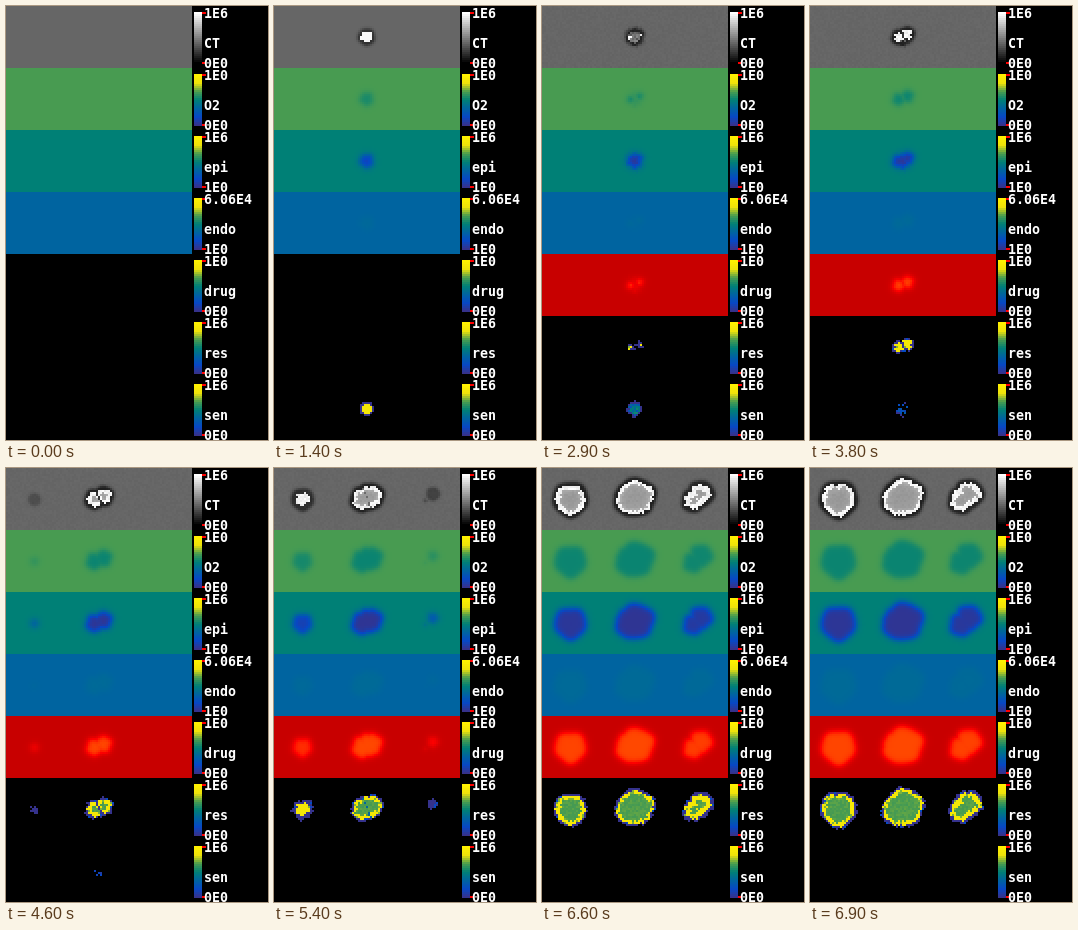
These frames come from a looping animation (262x434 px, 7000 ms). An HTML page with a canvas:

```html
<!DOCTYPE html>
<html lang="en">
<head>
<meta charset="utf-8">
<title>Tumour growth panels</title>
<style>
  html, body { margin: 0; width: 100%; height: 100%; overflow: hidden; background: #000; }
  canvas, svg { position: absolute; left: 0; top: 0; display: block; }
  canvas { width: 186px; height: 434px; image-rendering: pixelated; }
  text { font: bold 13.3px "DejaVu Sans Mono", monospace; fill: #fff; }
</style>
</head>
<body>
<canvas id="cells" width="93" height="217"></canvas>
<svg id="legend" width="262" height="434" viewBox="0 0 262 434"></svg>
<script>
const LOOP = 7000, STEP = 100, END = 6900, COLS = 93, ROWS = 31;
const DRUG_START = 1500;
const BLACK = [0, 0, 0];

const clamp = v => Math.max(0, Math.min(1, v));
const rise = (t, from, tau) => t < from ? 0 : 1 - Math.exp(-(t - from) / tau);
const sigmoid = v => 1 / (1 + Math.exp(-v));

// Colour map with evenly spaced stops
function palette(...stops) {
  const rgb = stops.map(s => [1, 3, 5].map(p => parseInt(s.slice(p, p + 2), 16)));
  return v => {
    const p = clamp(v) * (rgb.length - 1);
    const i = Math.min(Math.floor(p), rgb.length - 2);
    return rgb[i].map((c, n) => c + (rgb[i + 1][n] - c) * (p - i));
  };
}
const grey = palette('#000000', '#ffffff');
const heat = palette('#35328c', '#0648c6', '#0064a0', '#008076', '#4a9c50', '#eee20a', '#fff000');
const red = palette('#c80000', '#ff0000', '#ff4800');

const panels = [
  ['CT', '1E6', '0E0'], ['O2', '1E0', '0E0'], ['epi', '1E6', '1E0'],
  ['endo', '6.06E4', '1E0'], ['drug', '1E0', '0E0'], ['res', '1E6', '0E0'], ['sen', '1E6', '0E0']
];

// Lobes reach `size` at the end of the loop; `ease` bends their growth
const lobe = (x, y, born, size, ease) => ({ x, y, born, size, ease });
const colonies = [
  { seen: 400, core: 0, spread: 0, lobes: [
    lobe(97.5, 28.3, 1900, 17.3, 1), lobe(88.7, 31.4, 1900, 17.3, 1), lobe(93, 29.5, 4200, 20, .55)] },
  { seen: 4300, core: 5, spread: 7, lobes: [lobe(28.5, 31.5, 4500, 18.5, .6)] },
  { seen: 4900, core: 5, spread: 8, lobes: [
    lobe(159, 26, 5000, 14, .6), lobe(151.5, 32.5, 5400, 13, .6)] }
];
const sensitive = { x: 92.6, y: 31 };

function hash(x, y, s) {
  const v = Math.sin(x * 127.1 + y * 311.7 + s * 74.7) * 43758.5453;
  return v - Math.floor(v);
}

const radius = (l, t) => l.size * Math.pow(clamp((t - l.born) / (END - l.born)), l.ease);

// Distance inside a slightly wavy circle
function depth(x, y, c, r) {
  const a = Math.atan2(y - c.y, x - c.x);
  const wave = .03 * Math.sin(3 * a + c.x) + .03 * Math.sin(5 * a + c.y);
  return r * (1 + wave) - Math.hypot(x - c.x, y - c.y);
}

const ctx = document.getElementById('cells').getContext('2d');
const image = ctx.createImageData(COLS, ROWS * panels.length);

function paint(t) {
  const drug = t >= DRUG_START;
  const density = drug ? Math.exp((DRUG_START - t) / 1400) : 1;
  const alive = clamp((4800 - t) / 2000);
  const senR = Math.min(.0052 * t, 8.5);
  const cleft = t > 3000 && t < 5900;
  const fused = t > 4900;

  const state = colonies.map(c => {
    const young = Math.exp(-Math.max(0, t - c.lobes[0].born) / 700);
    return {
      ...c, young, amp: rise(t, c.seen, 650),
      radii: c.lobes.map(l => radius(l, t)),
      rim: 2 + c.spread * young, rough: .9 + 2 * young
    };
  });

  for (let j = 0; j < ROWS; j++) for (let i = 0; i < COLS; i++) {
    const x = 2 * i + 1, y = 2 * j + 1;
    const n = hash(i, j, 1), m = hash(i, j, 2);
    const senD = depth(x, y, sensitive, senR) - (drug ? m * 1.5 : 0);
    let field = 0, uptake = 0, shade = 0, body = 0, res = BLACK, sen = BLACK;

    state.forEach((c, k) => {
      const ds = c.lobes.map((l, q) => depth(x, y, l, c.radii[q]));
      const d = Math.max(...ds);
      const halo = Math.max(d, c.core - Math.hypot(x - c.lobes[0].x, y - c.lobes[0].y));
      const own = c.amp * sigmoid((halo - 1) / 1.8);
      const treated = k ? 0 : c.amp * sigmoid((senD - 1) / 1.8);
      field = Math.max(field, own, treated);
      uptake = Math.max(uptake, own, treated * density);
      const out = Math.max(0, 1 - Math.max(halo, k ? halo : senD));
      shade = Math.max(shade, c.amp * Math.exp(-out * out / 8));

      const e = d + (n * 2 - 1) * c.rough - c.rim;
      if (c.radii[0] < .5 || e <= -c.rim) return;
      if (e <= 0) {
        res = heat(m > .9 ? .18 : 0);
      } else if (cleft && !k && Math.abs(ds[0] - ds[1]) < (fused ? 1 : 2) && (!fused || m > .45)) {
        res = heat(fused ? .35 : 0);
        body = fused ? .42 : .2;
      } else {
        const inner = e > 2.2 + 2 * m + 20 * c.young;
        res = heat(inner ? .65 + m * .04 : m > .88 ? .72 : .9);
        body = inner ? .58 + .1 * Math.exp((3 - e) / 3) + m * .03 : .9 + m * .1;
      }
    });

    if (senD > 0 && hash(i, j, 5) < alive) {
      const level = drug ? density * (.6 + m * .9) * clamp(senD / 2) : .88;
      sen = heat(senD < 2 ? 0 : level);
      if (senD > 1.6 && !body) body = drug ? .25 + density * (.2 + m * .6) : .97;
    }

    const grain = drug ? (n - .5) * .02 : 0;
    [
      grey(body || .4 + grain - .27 * shade),
      heat(.662 - .14 * uptake),
      heat(.5 - .48 * field),
      heat(.333 + .035 * uptake),
      drug ? red(uptake) : BLACK,
      res,
      sen
    ].forEach((c, p) => image.data.set([...c, 255], ((p * ROWS + j) * COLS + i) * 4));
  }
  ctx.putImageData(image, 0, 0);
}

function buildLegend() {
  const rect = (x, y, w, c) => `<rect x="${x}" y="${y}" width="${w}" height="2" fill="rgb(${c})"/>`;
  const label = (y, s) => `<text x="198" y="${y}">${s}</text>`;
  const bar = map => Array.from({ length: 26 }, (_, i) => rect(188, 6 + 2 * i, 8, map(1 - i / 25))).join('');
  document.getElementById('legend').innerHTML = panels.map(([name, max, min], k) =>
    `<g transform="translate(0 ${k * 62})">${bar(k ? heat : grey)}
      ${rect(196, 6, 4, '255,0,0')}${rect(196, 56, 4, '255,0,0')}
      ${label(12, max)}${label(42, name)}${label(62, min)}</g>`).join('');
}

let last = -1;
const start = performance.now();
function frame() {
  const t = Math.floor(((performance.now() - start) % LOOP) / STEP) * STEP;
  if (t !== last) paint(last = t);
  requestAnimationFrame(frame);
}
buildLegend();
frame();
</script>
</body>
</html>
```
